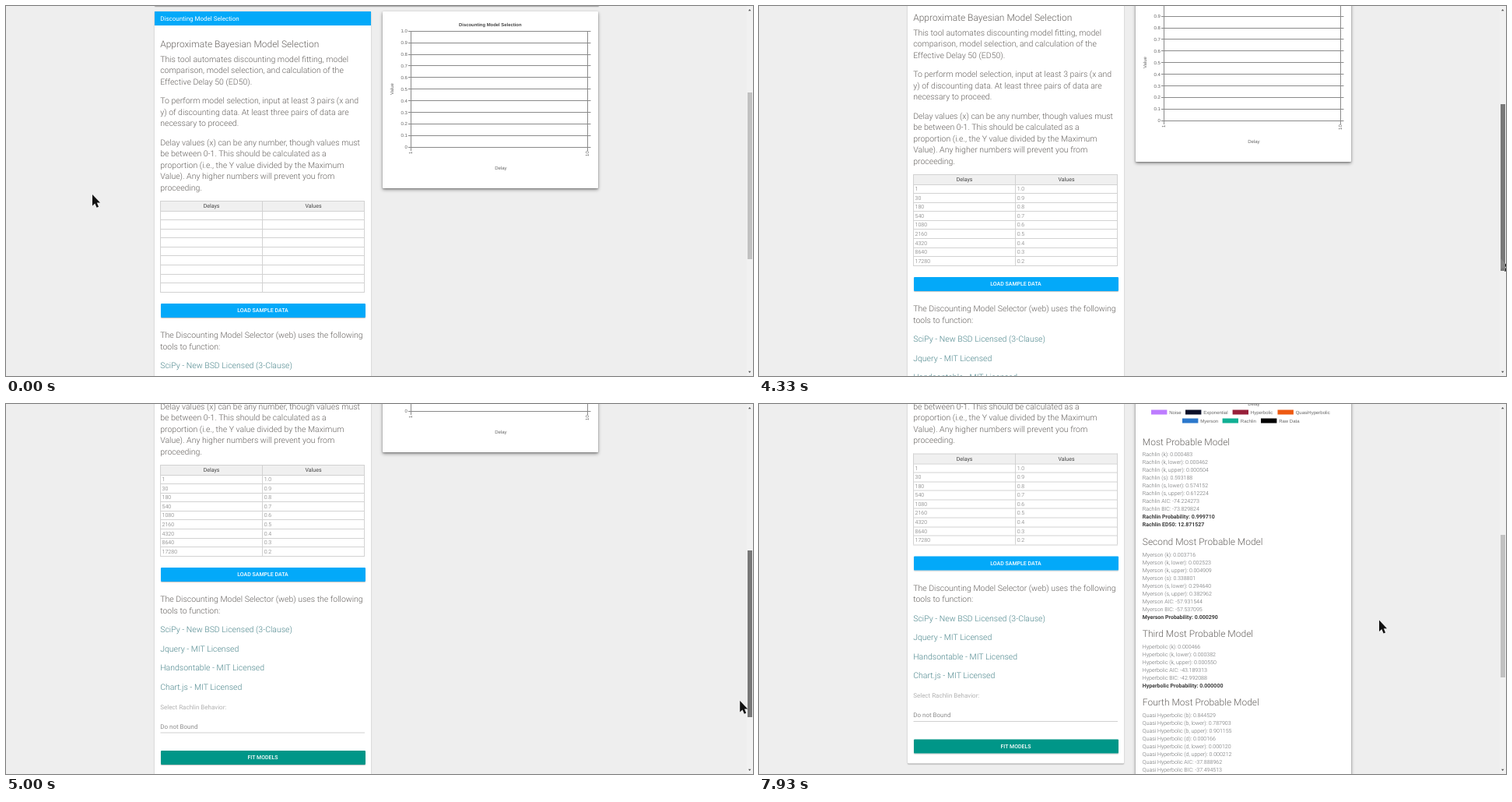
Recreate the animation shown at these times as an HTML page. Size 960 by 475 pixels, loop 8000 ms.

```html
<!DOCTYPE html>
<html lang="en">
<head>
<meta charset="utf-8">
<title>Discounting Model Selection</title>
<style>
html, body { margin: 0; width: 100%; height: 100%; overflow: hidden; background: #eee; }
#stage { position: relative; width: 960px; height: 475px; overflow: hidden; background: #eee; }
#page, #page > div, #page > svg, .ripple, #bar, #thumb, #arrows, #cursor { position: absolute; }
#page { left: 0; top: 0; }
svg { left: 0; top: 0; overflow: visible; }
text { font-family: Roboto, sans-serif; text-rendering: geometricPrecision; white-space: pre; }
.chart text { font-family: "Liberation Sans", Arial, sans-serif; }
.card { background: #fff; border-radius: 1px; }
.left { box-shadow: 0 1px 1px rgba(0,0,0,.14), 0 .5px 2.5px rgba(0,0,0,.14), 0 1px 1px rgba(0,0,0,.12); }
.right { box-shadow: 0 2px 4.5px rgba(0,0,0,.38), 0 1px 2px rgba(0,0,0,.26); }
.btn { overflow: hidden; border-radius: 1px; }
.shade { border-radius: 1px; box-shadow: 0 1px 1px rgba(0,0,0,.24); }
.ripple { border-radius: 50%; background: #fff; }
#bar { left: 951.5px; top: 0; width: 8.5px; height: 475px; background: #f1f1f1; }
#thumb { left: 952.5px; width: 6.5px; }
#cursor { mix-blend-mode: difference; }
</style>
</head>
<body>
<div id="stage">
  <div id="page"></div>
  <div id="bar"></div>
  <div id="thumb"></div>
  <svg id="arrows" width="960" height="475">
    <path d="M954 6.2h3.4l-1.7-2.2zM954 468.8h3.4l-1.7 2.2z" fill="#505050"/>
  </svg>
  <!-- The pointer inverts whatever lies under it -->
  <svg id="cursor" width="960" height="475">
    <path id="arrow" d="M0 0V14.4L3.3 11.5 5.6 16.8 8 15.8 5.8 10.6H10Z" fill="#fff"/>
  </svg>
</div>
<script>
const LOOP = 8000, STEP = 200 / 3;
const LOAD = 2270, CLICK = 5930, PLOT = 6200, DONE = 6730;
const BLUE = '#03a9f9', GREEN = '#009688', BODY = '#66625f', LINK = '#4c868c';
const $ = id => document.getElementById(id);
const page = $('page');

function box(x, y, w, h, cls, color) {
  const el = document.createElement('div');
  el.className = cls;
  Object.assign(el.style, { left: x + 'px', top: y + 'px', width: w + 'px', height: h + 'px' });
  if (color) el.style.background = color;
  page.append(el);
  return el;
}

function svg(parent, tag, attrs) {
  const el = document.createElementNS('http://www.w3.org/2000/svg', tag);
  for (const k in attrs) el.setAttribute(k, attrs[k]);
  parent.append(el);
  return el;
}

function text(parent, str, x, y, size, fill, weight = 300, more = {}) {
  svg(parent, 'text', { x, y, 'font-size': size, fill, 'font-weight': weight, ...more }).textContent = str;
}

const line = (parent, d, stroke, w = 1) => svg(parent, 'path', { d, stroke, 'stroke-width': w, fill: 'none' });
const rect = (parent, x, y, width, height, fill) => svg(parent, 'rect', { x, y, width, height, fill });
const crisp = v => Math.floor(v) + .5;
const MID = { 'text-anchor': 'middle' };
const turned = (x, y) => ({ ...MID, transform: `rotate(-90 ${x} ${y})` });

// Cards and buttons
box(191, -12, 570.5, 11.6, 'card left');
box(191, 7, 277.5, 640.5, 'card left');
const rightCard = box(483.7, 7, 277.6, 226.6, 'card right');
box(191, 7, 277.5, 18, '', BLUE);

function button(y, color) {
  box(199, y, 262.5, 18, 'shade');
  const el = box(199, y, 262.5, 18, 'btn', color);
  const dot = document.createElement('div');
  dot.className = 'ripple';
  el.append(dot);
  return dot;
}
const loadRipple = button(382, BLUE), fitRipple = button(617, GREEN);

// Left column
const ink = svg(page, 'svg', { width: 960, height: 700 });
text(ink, 'Discounting Model Selection', 198.2, 18.6, 8, '#fff', 400);
text(ink, 'Approximate Bayesian Model Selection', 198.2, 52.8, 12, BODY);

function paragraph(y, color, ...rows) {
  rows.forEach((s, i) => text(ink, s, 198.2, y + i * 14.5, 10.5, color));
}
paragraph(71.7, BODY, 'This tool automates discounting model fitting, model',
  'comparison, model selection, and calculation of the', 'Effective Delay 50 (ED50).');
paragraph(125.2, BODY, 'To perform model selection, input at least 3 pairs (x and',
  'y) of discounting data. At least three pairs of data are', 'necessary to proceed.');
paragraph(178.7, BODY, 'Delay values (x) can be any number, though values must',
  'be between 0-1. This should be calculated as a', 'proportion (i.e., the Y value divided by the Maximum',
  'Value). Any higher numbers will prevent you from', 'proceeding.');
paragraph(426.2, BODY, 'The Discounting Model Selector (web) uses the following', 'tools to function:');
['SciPy - New BSD Licensed (3-Clause)', 'Jquery - MIT Licensed', 'Handsontable - MIT Licensed',
  'Chart.js - MIT Licensed'].forEach((s, i) => paragraph(465.2 + i * 24.5, LINK, s));
text(ink, 'Select Rachlin Behavior:', 198.2, 563.8, 8, '#b0b0b0', 400);
text(ink, 'Do not Bound', 198.2, 588.6, 8, '#8c8c8c', 400);
line(ink, 'M198.5 594H461', '#d0d0d0');
text(ink, 'LOAD SAMPLE DATA', 330, 393.1, 7, '#fff', 500, MID);
text(ink, 'FIT MODELS', 330, 628.1, 7, '#fff', 500, MID);

// Data table
const ROW = 11.55, TOP = 263.2;
rect(ink, 198.5, 250.5, 262, 12.7, '#f0f0f0');
let grid = 'M198 250.5H461M198.5 250V367M329.5 250V367M460.5 250V367';
for (let i = 0; i < 10; i++) grid += `M198 ${crisp(TOP + i * ROW)}H461`;
line(ink, grid, '#d2d2d2');
text(ink, 'Delays', 264, 259.1, 7, '#444', 400, MID);
text(ink, 'Values', 395, 259.1, 7, '#444', 400, MID);
const cells = svg(ink, 'g');
[1, 30, 180, 540, 1080, 2160, 4320, 8640, 17280].forEach((delay, i) => {
  const y = TOP + i * ROW + 8;
  text(cells, delay, 200.6, y, 7, '#6e6e6e');
  text(cells, (1 - i / 10).toFixed(1), 331.8, y, 7, '#6e6e6e');
});

// Empty chart
const GREY = '#666';
const empty = svg(ink, 'g', { class: 'chart' });
text(empty, 'Discounting Model Selection', 622.3, 25.7, 5.9, '#444', 700, MID);
let rules = 'M520.5 32V186M747.5 32V186';
for (let i = 0; i <= 10; i++) {
  const y = 32.2 + i * 14.9;
  rules += `M517 ${crisp(y)}H751.5`;
  text(empty, i == 10 ? '0' : (1 - i / 10).toFixed(1), 515.8, y + 2, 6, GREY, 400, { 'text-anchor': 'end' });
}
line(empty, rules, '#8a8a8a');
text(empty, 'Value', 498, 106.5, 6, GREY, 400, turned(498, 106.5));
text(empty, '1', 522, 188.4, 6, GREY, 400, turned(522, 188.4));
text(empty, '10', 749, 189.6, 6, GREY, 400, turned(749, 189.6));
text(empty, 'Delay', 635.8, 209.8, 6, GREY, 400, MID);

// Legend of the filled chart
const plot = svg(ink, 'g', { class: 'chart' });
text(plot, 'Delay', 635.8, 188, 6, GREY, 400, MID);
[['Noise', 504, 0, '#bd7cff'], ['Exponential', 548, 0, '#0b1029'], ['Hyperbolic', 608.6, 0, '#98203a'],
  ['QuasiHyperbolic', 666.5, 0, '#ee5a12'], ['Myerson', 544, 1, '#2b78cc'], ['Rachlin', 595.6, 1, '#10b094'],
  ['Raw Data', 645, 1, '#000']].forEach(([name, x, row, color]) => {
  const y = 197 + row * 11;
  rect(plot, x, y - 3, 20.4, 6, color);
  text(plot, name, x + 23.2, y + 2.1, 6, GREY, 400);
});

// Fitted models
const results = svg(ink, 'g');
let y = 235.2;
function model(title, name, fields, summary) {
  text(results, title, 492.8, y + 4.2, 12, BODY);
  y += 16.3;
  for (const f of fields) { text(results, `${name} ${f}`, 492.8, y + 2.4, 7, '#67696b'); y += 10; }
  for (const s of summary) { text(results, `${name} ${s}`, 492.8, y + 2.4, 7, '#3c3c3c', 700); y += 10; }
  y += 11.8;
}
model('Most Probable Model', 'Rachlin', ['(k): 0.000483', '(k, lower): 0.000462', '(k, upper): 0.000504',
  '(s): 0.593188', '(s, lower): 0.574152', '(s, upper): 0.612224', 'AIC: -74.224273', 'BIC: -73.829824'],
  ['Probability: 0.999710', 'ED50: 12.871527']);
model('Second Most Probable Model', 'Myerson', ['(k): 0.003716', '(k, lower): 0.002523', '(k, upper): 0.004909',
  '(s): 0.338801', '(s, lower): 0.294640', '(s, upper): 0.382962', 'AIC: -57.931544', 'BIC: -57.537095'],
  ['Probability: 0.000290']);
model('Third Most Probable Model', 'Hyperbolic', ['(k): 0.000466', '(k, lower): 0.000382', '(k, upper): 0.000550',
  'AIC: -43.189313', 'BIC: -42.992088'], ['Probability: 0.000000']);
model('Fourth Most Probable Model', 'Quasi Hyperbolic', ['(b): 0.844529', '(b, lower): 0.787903',
  '(b, upper): 0.901155', '(d): 0.000166', '(d, lower): 0.000120', '(d, upper): 0.000212',
  'AIC: -37.888962', 'BIC: -37.494513'], []);

// Motion: [time, value...]
const POINTER = [[533, 111, 242], [800, 133, 264], [1130, 186, 316], [1400, 217, 344], [1600, 268, 364],
  [1930, 353, 386], [2230, 353, 386], [2500, 385, 394], [2800, 536.5, 376.8], [2930, 710, 350], [3070, 901, 316],
  [3330, 932, 314], [3600, 951, 314], [3830, 951, 312], [4333, 953, 324], [4533, 950, 348], [4670, 948, 362],
  [5000, 943.2, 381], [5270, 940, 386], [5470, 920, 389], [5530, 903, 390], [5600, 796, 400.2],
  [5800, 520, 422], [6000, 345, 441], [6660, 345, 441], [6930, 480, 410], [7200, 670, 360], [7330, 670, 360],
  [7530, 745, 308], [7670, 797, 279], [7870, 797, 279], [7930, 797, 277.6]];
const SCROLL = [[3800, 0], [4100, 10], [4333, 34], [4533, 81], [4670, 112], [5000, 172], [5130, 186.5]];

function at(keys, t) {
  const i = keys.findIndex(k => k[0] > t);
  if (i <= 0) return keys[i ? keys.length - 1 : 0].slice(1);
  const a = keys[i - 1], b = keys[i], p = (t - a[0]) / (b[0] - a[0]);
  return a.slice(1).map((v, n) => v + (b[n + 1] - v) * p);
}

function ripple(dot, t, x, hold) {
  const grow = Math.min(1, Math.max(0, t / 450)), r = 290 * grow;
  const fade = Math.min(1, Math.max(0, 1 - (t - hold) / 300));
  Object.assign(dot.style, { left: x - r + 'px', top: 9 - r + 'px', width: 2 * r + 'px', height: 2 * r + 'px',
    opacity: t < 0 ? 0 : .12 * fade });
}

const show = (el, on) => el.style.visibility = on ? 'visible' : 'hidden';

function draw(t) {
  const [x, py] = at(POINTER, t), [scroll] = at(SCROLL, t);
  $('arrow').setAttribute('transform', `translate(${x} ${py})`);
  page.style.transform = `translateY(${-Math.round(scroll * 2) / 2}px)`;
  show(cells, t >= LOAD);
  show(empty, t < PLOT);
  show(plot, t >= PLOT);
  show(results, t >= DONE);
  rightCard.style.height = (t < DONE ? 226.6 : 800) + 'px';
  ripple(loadRipple, t - LOAD, 154, 640);
  ripple(fitRipple, t - CLICK, 146, 700);

  const height = t < DONE ? 1016 : 1186, scale = 457 / height;
  const held = t >= 3800 && t < 5270, hover = t >= 3400 && t < 5400;
  Object.assign($('thumb').style, { top: 9 + (227 + scroll) * scale + 'px', height: 475 * scale + 'px',
    background: held ? '#787878' : hover ? '#a8a8a8' : '#c1c1c1' });
}

function tick() {
  const t = performance.now() % LOOP;
  draw(Math.floor(t / STEP + .06) * STEP + .5);
  requestAnimationFrame(tick);
}
tick();
</script>
</body>
</html>
```
